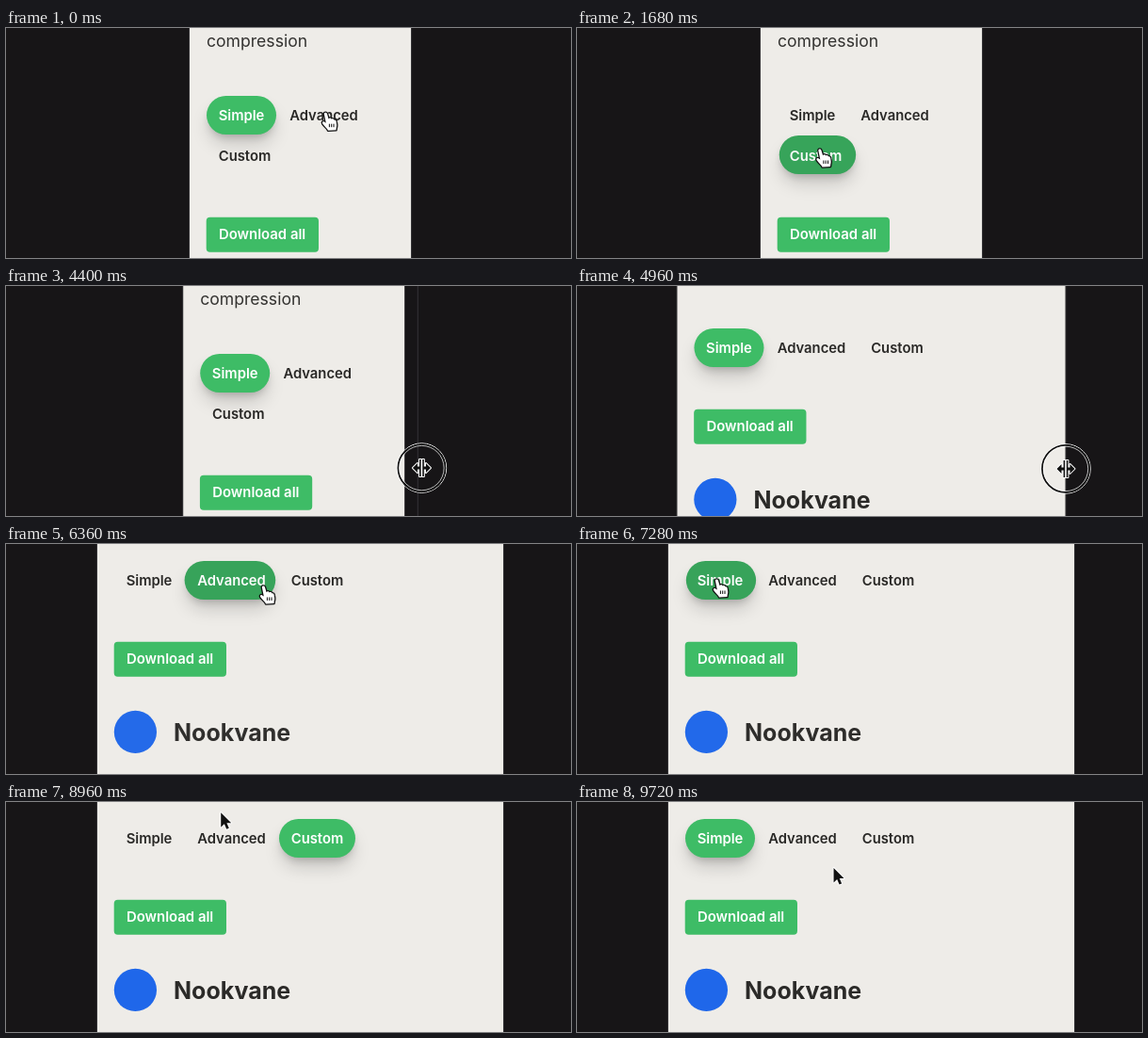
Write an HTML page with a canvas that moves like this. It is 600 px wide and 244 px high and loops after 9.76 s.

```html
<!DOCTYPE html>
<html lang="en">
<head>
<meta charset="utf-8">
<title>Sliding tabs</title>
<style>
  html, body { margin: 0; width: 100%; height: 100%; overflow: hidden; background: #171517; }
  canvas { display: block; width: 600px; height: 244px; }
</style>
</head>
<body>
<canvas width="600" height="244"></canvas>
<script>
const ctx = document.querySelector('canvas').getContext('2d');
const LOOP = 9760, CENTER = 312.5, SLIDE = 430, TRAVEL = 500;
const DRAG = { start: 4250, end: 5140 };
const DARK = [41, 40, 38], WHITE = [255, 255, 255], GREEN = [62, 188, 102], HOVER = [55, 163, 90];

// where the pointer rests, and the tab it clicks there
const stops = [
  { at: 80, x: 341, y: 97, tab: 1 },
  { at: 1293, x: 259.5, y: 129, tab: 2 },
  { at: 2330, x: 252, y: 90, tab: 0 },
  { at: 4100, x: 435, y: 193 },
  { at: DRAG.end, x: 528, y: 194, drag: true },
  { at: 5968, x: 275, y: 45, tab: 1 },
  { at: 6880, x: 150, y: 38, tab: 0 },
  { at: 8000, x: 344, y: 43, tab: 2 },
  { at: 9180, x: 150, y: 38, tab: 0 },
  { at: 9740, x: 273, y: 70 }
];
const clicks = stops.filter(s => 'tab' in s);

const hand = new Path2D('M-3.2 .8C-2.8-.8-.6-.8 0 .9L1.6 6.2C2.4 4.9 4.2 5.2 4.6 6.6C5.6 5.6 7.2 6.2 7.4 7.5C8.6 6.9 9.6 7.9 9.7 9.2L10.2 12.5C10.4 14.5 9.6 15.5 9.5 18L1 18.5C.5 16.5-2.5 14.5-4.8 11.2C-5.8 9.6-4.2 8.6-2.9 9.4L-1.2 10.6Z');
const knuckles = new Path2D('M2.4 11.5V15M4.7 11.5V15M7 11.5V15');
const arrow = new Path2D('M0 0V15.5L3.6 12.2L6 17.6L8.6 16.5L6.2 11.2H11Z');
const halfResizer = new Path2D('M.8-9H2.4V-1.5H4.5V-5L9.5 0L4.5 5V1.5H2.4V9H.8Z');
const resizer = new Path2D(halfResizer);
resizer.addPath(halfResizer, new DOMMatrix([-1, 0, 0, 1, 0, 0]));

const mix = (a, b, p) => a + (b - a) * p;
const ramp = (t, start, end) => {
  const p = Math.min(1, Math.max(0, (t - start) / (end - start)));
  return (1 - Math.cos(Math.PI * p)) / 2;
};
const rgb = (a, b, p) => `rgb(${a.map((v, i) => mix(v, b[i], p)).join()})`;

// moves between tabs follow a shallow arc, the drag is straight
function pointerAt(t) {
  const i = Math.max(0, stops.findIndex(s => s.at > t));
  const to = stops[i], from = stops[i - 1] || to;
  const p = ramp(t, to.drag ? DRAG.start : to.at - TRAVEL, to.at);
  const lift = to.tab >= 0 ? 120 * p * (1 - p) : 0;
  return [mix(from.x, to.x, p), mix(from.y, to.y, p) - lift];
}

function write(text, x, y, size, weight, color, align = 'left') {
  ctx.font = `${weight} ${size}px Inter, sans-serif`;
  ctx.textAlign = align;
  ctx.fillStyle = color;
  ctx.fillText(text, x, y);
}

function roundBox(x, y, w, h, r, color) {
  ctx.fillStyle = color;
  ctx.beginPath();
  ctx.roundRect(x, y, w, h, r);
  ctx.fill();
}

function drawPill({ x, y, w }, color) {
  ctx.save();
  ctx.shadowColor = 'rgba(0,0,0,.18)';
  for (const depth of [12, 5]) {
    ctx.shadowBlur = depth * 1.6;
    ctx.shadowOffsetY = depth;
    roundBox(x + 3, y + 3, w - 6, 35, 17.5, color);
  }
  ctx.restore();
  roundBox(x, y, w, 41, 20.5, color);
}

function ring(x, y, r, width, color) {
  ctx.strokeStyle = color;
  ctx.lineWidth = width;
  ctx.beginPath();
  ctx.arc(x, y, r, 0, 7);
  ctx.stroke();
}

function drawPointer(x, y, shape, pressed) {
  if (pressed) {
    ring(x, y, 26.2, 1, '#fff');
    ring(x, y, 25, 1.8, '#111');
    ring(x, y, 23.7, .7, '#fff');
  }
  const isHand = shape === hand;
  ctx.save();
  ctx.translate(x, y);
  ctx.lineJoin = 'round';
  ctx.strokeStyle = isHand ? '#111' : '#fff';
  ctx.fillStyle = isHand ? '#fff' : '#111';
  ctx.lineWidth = isHand ? 2.6 : 2;
  ctx.stroke(shape);
  ctx.fill(shape);
  if (isHand) {
    ctx.lineWidth = 1;
    ctx.stroke(knuckles);
  }
  ctx.restore();
}

function draw(now) {
  const t = now % LOOP;
  const edge = mix(430, 528, ramp(t, DRAG.start, DRAG.end));
  const left = CENTER * 2 - edge;
  // the page repaints slightly after the drag begins
  const width = t < DRAG.start + 190 ? 235 : edge - left;
  const wide = width >= 292;
  const row = 93 - (width >= 300 ? 27 : 0) - (width >= 422 ? 27 : 0);

  ctx.fillStyle = '#171517';
  ctx.fillRect(0, 0, 600, 244);
  ctx.fillStyle = '#353437';
  ctx.fillRect(left - 1, 0, edge - left + 2, 244);
  ctx.fillStyle = '#171517';
  ctx.fillRect(left, 0, edge - left, 244);
  ctx.fillStyle = '#eeece8';
  ctx.fillRect(left, 0, width, 244);

  write('compression', left + 18, row - 73, 17.6, 400, '#333230');

  const tabs = [
    { name: 'Simple', x: left + 18, y: row - 21, w: 74 },
    { name: 'Advanced', x: left + 94, y: row - 21, w: 97 },
    { name: 'Custom', x: left + (wide ? 193 : 18), y: row + (wide ? -21 : 22), w: 81 }
  ];
  const done = clicks.filter(c => c.at <= t);
  const current = done.at(-1) || { at: -SLIDE, tab: 0 };
  const to = current.tab, from = (done.at(-2) || { tab: 0 }).tab;
  const p = ramp(t, current.at, current.at + SLIDE);

  const [px, py] = pointerAt(t);
  const over = tabs.findIndex(b => px > b.x && px < b.x + b.w && py > b.y && py < b.y + 41);

  const pill = {};
  for (const k of ['x', 'y', 'w']) pill[k] = mix(tabs[from][k], tabs[to][k], p);
  drawPill(pill, rgb(GREEN, HOVER, over === to ? p : 0));

  tabs.forEach((tab, i) => {
    const light = i === to ? p ** .7 : i === from ? 1 - p ** .3 : 0;
    write(tab.name, tab.x + tab.w / 2, tab.y + 26.3, 14.8, 600, rgb(DARK, WHITE, light), 'center');
  });

  const button = row + (wide ? 83 : 126);
  roundBox(left + 17.7, button - 18.3, 119.3, 37, 4, rgb(GREEN, GREEN, 0));
  write('Download all', left + 31, button + 5.3, 14.9, 600, '#fff');

  ctx.globalAlpha = 1 - .42 * Math.sin(Math.PI * p);
  roundBox(left + 17.8, button + 54.8, 45.2, 45.2, 22.6, '#1f67ea');
  write('Nookvane', left + 81, button + 86.6, 25, 700, '#2b2a28');
  ctx.globalAlpha = 1;

  const resizing = Math.abs(px - edge) < 10;
  const pressed = t > DRAG.start - 130 && t < DRAG.end + 60;
  drawPointer(px, py, resizing ? resizer : over >= 0 ? hand : arrow, pressed);
  requestAnimationFrame(draw);
}
requestAnimationFrame(draw);
</script>
</body>
</html>
```
